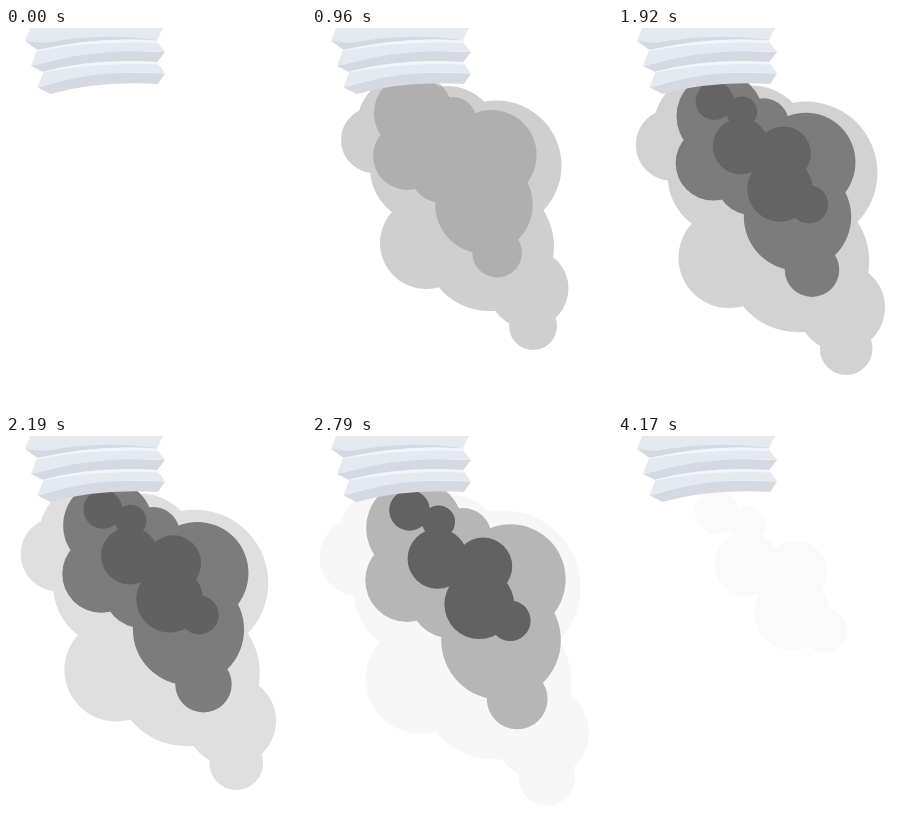
An HTML page with a canvas for the animation above (4.53 s loop, 300 by 380 pixels).

```html
<!DOCTYPE html>
<html lang="en">
<head>
<meta charset="utf-8">
<title>Exhaust smoke</title>
<style>
  html, body { margin: 0; width: 100%; height: 100%; overflow: hidden; background: #fff; }
  canvas { display: block; width: 300px; height: 380px; }
</style>
</head>
<body>
<canvas id="stage"></canvas>
<script>
const W = 300, H = 380, LOOP = 4530, STEP = 30, LAST = 4170;
const STAGGER = 510, GROWN = 2600, GONE = 3300;
const LIGHT = '#e5eaf1', DARK = '#d4d9e3', SHINE = '#f3f5f9';

const canvas = document.getElementById('stage');
const ctx = canvas.getContext('2d');
const ratio = window.devicePixelRatio || 1;
canvas.width = W * ratio;
canvas.height = H * ratio;
ctx.scale(ratio, ratio);

const clamp = (v, lo, hi) => Math.max(lo, Math.min(hi, v));

// Each puff swells from its origin at a steady rate per ms once it has rested.
// Its circles, [x, y, radius], are placed as they stand at the age "full".
const puffs = [
  {
    color: '#cbcbcb', origin: [146, 62], rate: 1e-4, rest: 0, full: 720,
    circles: [[62, 112, 33], [95, 97, 50], [135, 110, 52], [184.5, 137.5, 65],
      [113, 140, 55], [177, 218, 65], [114, 215, 46], [216.5, 260.5, 40], [221, 298, 24]]
  },
  {
    color: '#7c7c7c', origin: [96, 55], rate: 1.12e-4, rest: 480, full: 2490,
    circles: [[103, 94, 51], [95, 149, 44], [154, 103, 30], [204, 148, 58],
      [142, 165, 45.5], [194, 212, 63], [211, 274, 32]]
  },
  {
    color: '#626262', origin: [83, 53], rate: 7e-5, rest: 0, full: 1980,
    circles: [[98, 75, 21], [128, 87, 17], [127, 125, 31], [174, 133, 30],
      [170, 172, 36], [202, 189, 21]]
  }
];

// Quick ease in, long ease out, then a faint trace until the puff is gone.
function opacity(age) {
  if (age < 0 || age >= GONE) return 0;
  const fadeIn = clamp(age / 1000, 0, 1);
  const fadeOut = clamp((age - 1550) / 1400, 0, 1);
  return Math.max(.03, (1 - (1 - fadeIn) ** 2) * (1 - fadeOut) ** 1.5);
}

function drawPuff({ color, origin: [ox, oy], rate, rest, full, circles }, age) {
  const k = 1 + rate * (clamp(age, rest, GROWN) - full);
  ctx.globalAlpha = opacity(age);
  ctx.fillStyle = color;
  ctx.beginPath();
  for (const [x, y, r] of circles) {
    const cx = ox + (x - ox) * k, cy = oy + (y - oy) * k;
    ctx.moveTo(cx + r * k, cy);
    ctx.arc(cx, cy, r * k, 0, Math.PI * 2);
  }
  ctx.fill();
  ctx.globalAlpha = 1;
}

function fillPath(color, d) {
  ctx.fillStyle = color;
  ctx.fill(new Path2D(d));
}

// A fold of the hose: lit upper face, shaded lower face, bright top edge.
function drawFold(i) {
  const left = x => x + 6.5 * i, right = x => x + i, y = v => v + 21.5 * i;
  const rim = `M${left(31)} ${y(22)}Q90 ${y(8)} ${right(150)} ${y(12.5)}`;
  const tip = `${left(25)} ${y(38)}`;
  fillPath(DARK, `M${tip}L90 ${y(22)}L159 ${y(24)}L${right(151)} ${y(34.5)}Q92 ${y(31)} ${left(38)} ${y(44.5)}Z`);
  fillPath(LIGHT, `${rim}L159 ${y(24)}Q92 ${y(19)} ${tip}Z`);
  fillPath(SHINE, `${rim}L${right(152)} ${y(15)}Q90 ${y(12.5)} ${left(31)} ${y(23)}Z`);
}

function drawHose() {
  fillPath(DARK, 'M19 13L60 5H154L150 14Q90 12 33 23Z');
  fillPath(LIGHT, 'M24 0H157L151 12Q95 4 38 15L19 13Z');
  drawFold(0);
  drawFold(1);
}

function draw(t) {
  ctx.fillStyle = '#fff';
  ctx.fillRect(0, 0, W, H);
  puffs.forEach((puff, i) => drawPuff(puff, t - 240 - i * STAGGER));
  drawHose();
}

const begin = performance.now();
function tick() {
  const t = (performance.now() - begin) % LOOP;
  // The smoke advances in even steps and rests at the end of the loop.
  draw(Math.min(Math.floor(t / STEP) * STEP, LAST));
  requestAnimationFrame(tick);
}
tick();
</script>
</body>
</html>
```
